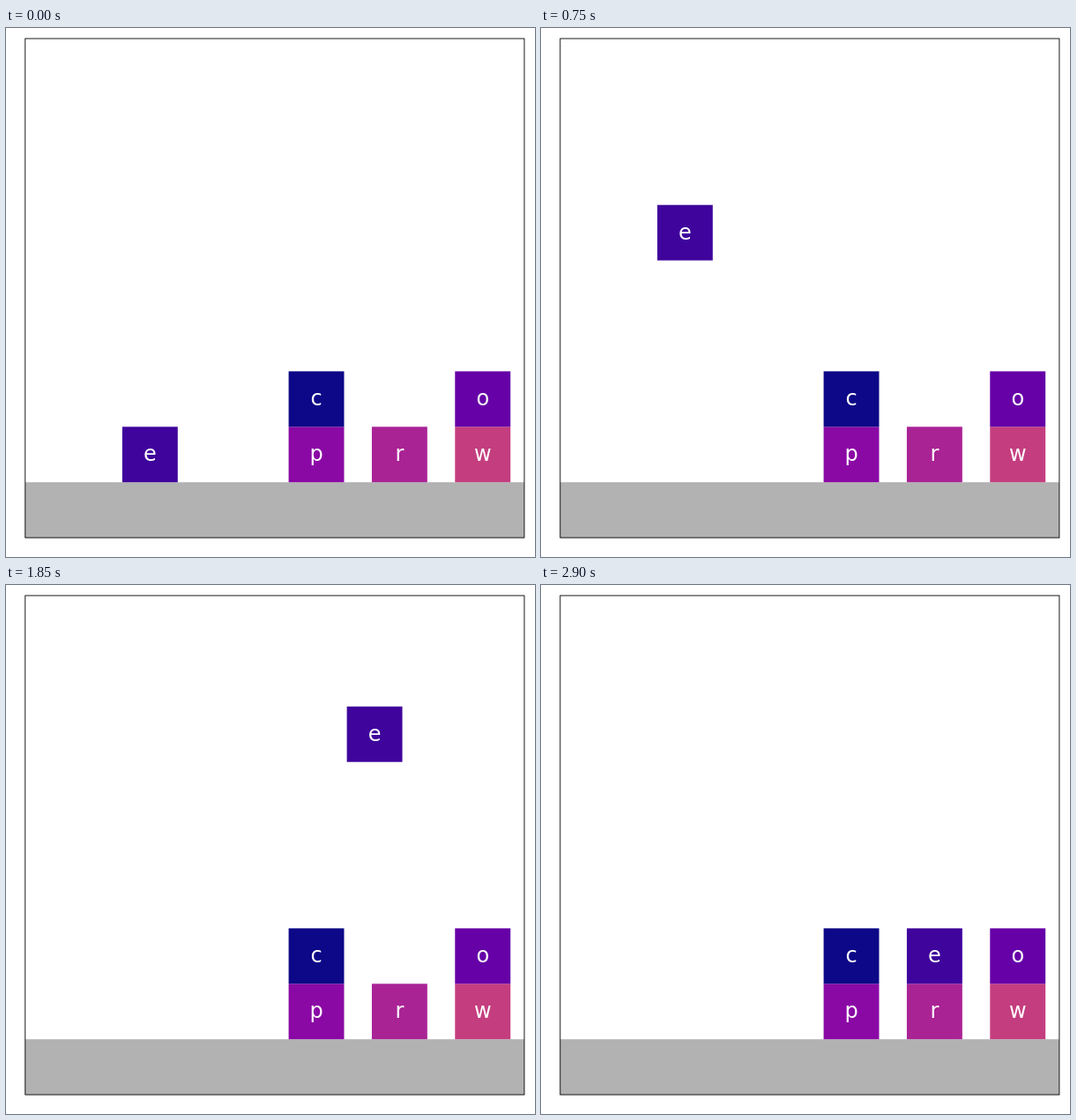
An HTML page with a canvas that plays this animation: 600 by 600 pixels, repeating every 2.95 s.

```html
<!DOCTYPE html>
<html lang="en">
<head>
<meta charset="utf-8">
<title>Block stacking</title>
<style>
  html, body { margin: 0; width: 100%; height: 100%; overflow: hidden; background: #fff; }
  canvas { display: block; }
</style>
</head>
<body>
<canvas id="stage" width="600" height="600"></canvas>
<script>
const ctx = document.getElementById('stage').getContext('2d');

const LOOP = 2950, STEP = 50;
const UNIT = 62.9, LEFT = 21.8, TOP = 12, SIDE = 9 * UNIT;
const GROUND = 515.2;

// Columns are 1.5 units apart; levels count up from the ground.
const colX = col => LEFT + (0.25 + 1.5 * col) * UNIT;
const levelY = level => GROUND - (level + 1) * UNIT;

const fixed = [
  ['p', 3, 0, '#8a09a5'],
  ['c', 3, 1, '#0d0887'],
  ['r', 4, 0, '#a92395'],
  ['w', 5, 0, '#c43e7f'],
  ['o', 5, 1, '#6600a7']
];

function block(label, col, level, color) {
  const x = colX(col), y = levelY(level);
  ctx.fillStyle = color;
  ctx.fillRect(x, y, UNIT, UNIT);
  ctx.fillStyle = '#fff';
  ctx.fillText(label, x + UNIT / 2, y + UNIT / 2 + 7.5);
}

// Lift, carry and lower at constant speeds; the first tick of lift and carry is skipped.
function pose(tick) {
  const lift = tick < 1 ? 0 : Math.min(5, 0.25 * (tick + 1));
  const carry = tick < 30 ? 0 : Math.min(3, 0.3 * (tick - 28));
  const lower = Math.max(0, 0.2 * (tick - 38));
  return { col: 1 + carry, level: lift - lower };
}

function draw(time) {
  const { col, level } = pose(Math.floor((time % LOOP) / STEP));
  ctx.fillStyle = '#fff';
  ctx.fillRect(0, 0, 600, 600);
  ctx.fillStyle = '#b2b2b2';
  ctx.fillRect(LEFT, GROUND, SIDE, TOP + SIDE - GROUND);

  ctx.font = '24px "DejaVu Sans", sans-serif';
  ctx.textAlign = 'center';
  ctx.textBaseline = 'alphabetic';
  for (const b of fixed) block(...b);
  block('e', col, level, '#3f049c');

  ctx.strokeStyle = '#000';
  ctx.lineWidth = 0.9;
  ctx.strokeRect(LEFT, TOP, SIDE, SIDE);
}

const start = performance.now();
function tick() {
  draw(performance.now() - start);
  requestAnimationFrame(tick);
}
tick();
</script>
</body>
</html>
```
